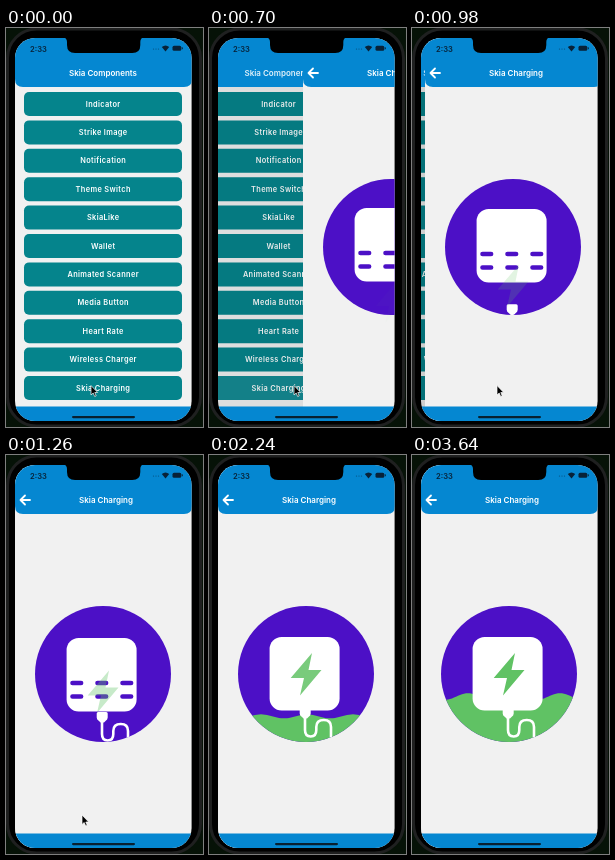
Write an HTML page that moves like this. It is 197 by 399 pixels and loops after 3780 ms.

```html
<!DOCTYPE html>
<html lang="en">
<head>
<meta charset="utf-8">
<title>Skia Charging</title>
<style>
  html, body { margin: 0; width: 100%; height: 100%; overflow: hidden; background: #061207; }
  svg { display: block; width: 100vw; height: 100vh; filter: blur(.35px); }
  text { font-family: Inter, "Open Sans", sans-serif; font-weight: 600; fill: #fff; text-anchor: middle; }
  .title { font-size: 8px; }
  .item text { font-size: 7.4px; letter-spacing: .35px; }
  .item rect { fill: #05848c; }
  .bar { fill: #0587d1; }
  .page { fill: #f1f1f1; }
  .line { fill: none; stroke: #fff; stroke-linecap: round; stroke-linejoin: round; }
</style>
</head>
<body>
<svg viewBox="0 0 197 399" preserveAspectRatio="none">
  <defs>
    <clipPath id="screen"><rect x="9" y="10" width="176.6" height="383" rx="20"/></clipPath>
    <clipPath id="disc"><circle cx="97" cy="219" r="68"/></clipPath>
    <path id="header" class="bar" d="M9 0H186V51Q186 59 178 59H17Q9 59 9 51Z"/>
  </defs>

  <rect x="1.5" y="1" width="193" height="397" rx="29" fill="#000" stroke="#1f2020" stroke-width="3"/>

  <g clip-path="url(#screen)">
    <g id="menu">
      <rect class="page" x="9" y="0" width="177" height="399"/>
      <use href="#header"/>
      <text id="menuTitle" class="title" x="97" y="48">Skia Components</text>
      <g id="items"></g>
    </g>
    <rect id="dim" x="9" y="59" width="177" height="320" opacity="0"/>

    <g id="detail">
      <rect class="page" x="9" y="0" width="177" height="399"/>
      <use href="#header"/>
      <text class="title" x="100" y="48">Skia Charging</text>
      <path class="line" stroke-width="1.8" d="M24 45H14.5M19 40.5L14.5 45L19 49.5"/>

      <circle cx="97" cy="219" r="68" fill="#4c10c6"/>
      <g clip-path="url(#disc)">
        <path id="wave" fill="#60c264"/>
        <g id="cable">
          <path class="line" stroke-width="2.6"
            d="M96 260V275Q96 281.5 101.7 281.5Q107.3 281.5 107.3 275V272Q107.3 265 114.8 265Q122 265 122 272V292"/>
          <path fill="#fff" d="M92 253H100.2Q101.7 253 101.7 254.5V258.5Q101.7 260.5 99.5 262L98 263.5H94.5L93 262Q90.7 260.5 90.7 258.5V254.5Q90.7 253 92 253Z"/>
        </g>
      </g>
      <g id="box">
        <rect x="60.6" y="182" width="70" height="73.5" rx="12" fill="#fff"/>
        <path id="dashes" fill="none" stroke="#4c10c6" stroke-width="4.6" stroke-linecap="round"
          d="M66.5 227h8.6m16.4 0h8.6m16.4 0h8.6M66.5 240.5h8.6m16.4 0h8.6m16.4 0h8.6"/>
      </g>
      <path id="bolt" fill="#60c264" d="M103 198L81.7 223H95L91 240.5L112.5 215H99.5Z"/>
    </g>

    <rect class="bar" x="9" y="378.5" width="177" height="20"/>
    <rect x="66" y="388" width="63" height="2.2" rx="1.1" fill="#082030"/>
    <g fill="#082238">
      <text x="32.5" y="23.5" style="font-size:7.6px;fill:#082238">2:33</text>
      <g opacity=".55">
        <circle cx="147.5" cy="21" r=".6"/><circle cx="150" cy="21" r=".6"/><circle cx="152.5" cy="21" r=".6"/>
      </g>
      <path d="M155.8 19Q159.5 15.8 163.2 19L159.5 23.4Z"/>
      <rect x="166.5" y="17.7" width="8.8" height="5" rx="1.5"/>
      <rect x="175.8" y="19.2" width="1" height="2" rx=".5"/>
    </g>
  </g>

  <path d="M57 9H138Q134.3 10 134.3 14V17Q134.3 25 126.3 25H69Q61 25 61 17V14Q61 10 57 9Z"/>
  <path id="cursor" stroke="#fff" stroke-width=".7" d="M0 0V9.5L2.2 7.5L3.7 11L5.2 10.3L3.8 7H6.7Z"/>
</svg>

<script>
  const LOOP = 3780, STEP = 140;
  const $ = id => document.getElementById(id);
  const labels = ["Indicator", "Strike Image", "Notification", "Theme Switch", "SkiaLike", "Wallet",
    "Animated Scanner", "Media Button", "Heart Rate", "Wireless Charger", "Skia Charging"];

  $("items").innerHTML = labels.map((label, i) => {
    const y = 76 + i * 28.4;
    return `<g class="item"><rect x="18" y="${y - 12}" width="158" height="24" rx="5"/>` +
      `<text x="97.2" y="${y + 2.6}">${label}</text></g>`;
  }).join("");
  const pressed = $("items").lastElementChild;

  const mix = (a, b, p) => a + (b - a) * p;
  const clamp = v => Math.max(0, Math.min(1, v));

  // Linear track through [time, value] stops
  function track(t, ...stops) {
    let [t0, v0] = stops[0];
    for (const [t1, v1] of stops) {
      if (t <= t1) return t1 > t0 ? mix(v0, v1, clamp((t - t0) / (t1 - t0))) : v1;
      [t0, v0] = [t1, v1];
    }
    return v0;
  }

  const set = (id, name, value) => $(id).setAttribute(name, value);
  const move = (id, x, y) => set(id, "transform", `translate(${x} ${y})`);

  function wavePath(t) {
    const p = 1 - Math.pow(1 - clamp((t - 1820) / 1120), 1.9);
    const late = clamp((t - 2240) / 700);
    const level = mix(290, 241.5, p);
    const height = mix(2, 3.3, late);
    const crest = mix(52, 56, late);
    let d = "M28 290";
    for (let x = 28; x <= 166; x += 2) {
      const y = level - height * Math.cos((x - crest) / 46 * 2 * Math.PI);
      d += `L${x} ${y.toFixed(2)}`;
    }
    return d + "V290Z";
  }

  function draw(t) {
    const slide = track(t, [560, 177], [700, 85], [840, 16], [980, 4], [1120, 1], [1260, 0]);
    const shown = 1 - slide / 177;
    move("menu", -53 * shown, 0);
    set("menuTitle", "opacity", 1 - .25 * shown);
    set("dim", "opacity", .15 * shown);
    move("detail", slide, 0);
    pressed.setAttribute("opacity", track(t, [420, 1], [560, .85], [700, .93], [840, 1]));

    move("box", 0, track(t, [840, -2], [1260, 1], [1540, 0]));
    set("dashes", "opacity", track(t, [1260, 1], [1540, 0]));
    move("cable", 0, track(t, [700, 40], [840, 33], [1260, 4], [1540, 0]));
    move("bolt", 0, track(t, [700, 55], [840, 49], [1260, 17.5], [1680, 0]));
    set("bolt", "opacity", track(t, [700, .02], [840, .1], [1260, .35], [2240, .84], [2520, 1]));
    set("wave", "d", wavePath(t));

    const x = track(t, [980, 85], [1120, 82], [1260, 76], [1400, 58]);
    const y = track(t, [980, 357.5], [1120, 358.5], [1260, 360], [1400, 380]);
    move("cursor", x, y);
    set("cursor", "visibility", t < 1540 ? "visible" : "hidden");
  }

  const start = performance.now();
  function tick() {
    const t = (performance.now() - start) % LOOP;
    draw(Math.floor(t / STEP) * STEP);
    requestAnimationFrame(tick);
  }
  tick();
</script>
</body>
</html>
```
